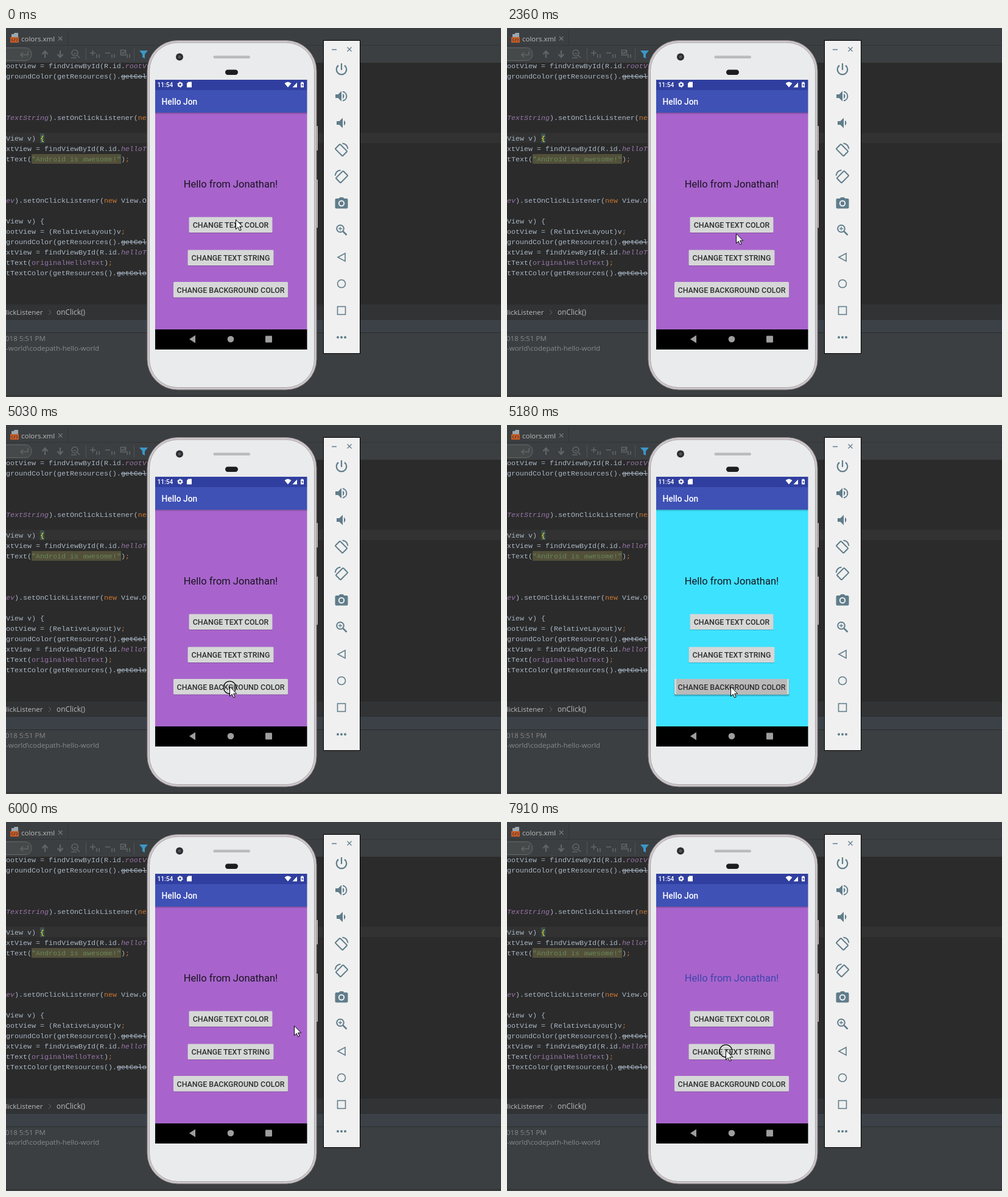
An HTML page that plays this animation: 813 by 606 pixels, repeating every 8 s.

```html
<!DOCTYPE html>
<html lang="en">
<head>
<meta charset="utf-8">
<title>Hello app in an emulator</title>
<style>
html, body { margin: 0; width: 100%; height: 100%; overflow: hidden; background: #3c3f41; }
svg { display: block; width: 813px; height: 606px; }
text { white-space: pre; }
.code { font: 11.667px "Liberation Mono", monospace; fill: #a9b7c6; }
.kw { fill: #cc7832; }
.fld { fill: #9876aa; }
.id { fill: #9876aa; font-style: italic; }
.str { fill: #6a8759; }
.brace { fill: #ffef28; }
.old { text-decoration: line-through; }
.ui { font: 11.5px "Open Sans", "Noto Sans", sans-serif; fill: #bbb; }
.dim { fill: #87898b; }
.app { font-family: Roboto, sans-serif; font-weight: 500; }
.btn text { font-size: 12.45px; fill: #2e2e2e; text-anchor: middle; }
.tool { fill: none; stroke: #626567; stroke-width: 1.6; }
.side { fill: none; stroke: #607d8b; stroke-width: 2; }
.solid { fill: #607d8b; stroke: none; }
</style>
</head>
<body>
<svg viewBox="0 0 813 606">
  <defs>
    <linearGradient id="fall" x2="0" y2="1">
      <stop offset="0" stop-opacity=".25"/><stop offset="1" stop-opacity="0"/>
    </linearGradient>
  </defs>

  <!-- editor window -->
  <rect width="813" height="606" fill="#3c3f41"/>
  <path d="M101.5 4V28M0 28.500H813" stroke="#323436"/>
  <path d="M9 10h4v-1l1-1h6v8H9z" fill="#9aa7b0"/>
  <rect x="7" y="15" width="14" height="9" fill="#c75c28"/>
  <path d="M11 17l-2 2.500 2 2.500M17 17l2 2.500-2 2.500M15 17l-2 5" fill="none" stroke="#45301f"/>
  <text class="ui" x="25" y="21.500">colors.xml</text>
  <path d="M86 14l6.500 6.500m0-6.500l-6.500 6.500" stroke="#77797b" stroke-width="1.200"/>
  <rect x="-20" y="32.500" width="62" height="21" rx="10" fill="#45494a" stroke="#646769"/>
  <g class="tool">
    <path d="M36 38v6H24m4-4l-4 4 4 4"/>
    <path d="M64 49V38m-4.500 5l4.500-5 4.500 5M89 37v11m-4.500-5l4.500 5 4.500-5" stroke-width="2.200"/>
    <circle cx="113" cy="41" r="5"/>
    <path d="M117 45l4 4M107 49h9M111 42h4"/>
    <path d="M138 41h9m-4.500-4.500v9M163 41h8M149 43v6m4-6v6M174 43v6m4-6v6M199 43v6m4-6v6"/>
    <path d="M188.500 36.500h8v8h-8zM190 40l2 2 4-4"/>
    <path d="M131.500 33v20M210.500 33v20" stroke="#515355" stroke-width="1"/>
  </g>
  <path d="M219 37h14l-5 6v7l-4-2v-5z" fill="#3b97c8"/>
  <rect y="57" width="813" height="397" fill="#2b2b2b"/>
  <rect y="172" width="813" height="17" fill="#323232"/>
  <rect x="56" y="173" width="7" height="16" fill="#3b514d"/>
  <rect x="42" y="207" width="147" height="16" fill="#52503a"/>
  <g id="code"></g>
  <rect y="454" width="813" height="25" fill="#313335"/>
  <rect y="479" width="813" height="21" fill="#3b4147"/>
  <path d="M0 478.500H813M0 500.500H813" stroke="#2b2d2f"/>
  <text class="ui" x="0" y="471">lickListener</text>
  <path d="M70 463l4 4-4 4" fill="none" stroke="#666"/>
  <text class="ui" x="83" y="471" style="font-size:11.900px">onClick()</text>
  <text class="ui dim" x="-1" y="514">018 5:51 PM</text>
  <text class="ui dim" x="0" y="530">-world\codepath-hello-world</text>
  <path d="M0 603.500H813" stroke="#2d2f31"/>

  <!-- phone -->
  <path d="M509 161h3v40h-3zM509 249h3v79h-3z" fill="#c9c3c6"/>
  <rect x="232" y="20.500" width="278" height="573.500" rx="50" fill="#cfc8cb" stroke="#8b868a"/>
  <rect x="235.500" y="24" width="271" height="566.500" rx="46.500" fill="#e9ebec" stroke="#aaa3a7"/>
  <circle cx="285" cy="47.500" r="6" fill="#2c2e32"/>
  <circle cx="285" cy="47.500" r="2.500" fill="#50545b"/>
  <rect x="340.500" y="45.500" width="60.500" height="4.500" rx="2.200" fill="#b9bbbc"/>
  <rect x="360" y="68.500" width="21" height="8.500" rx="4.200" fill="#1d1d1f"/>
  <rect id="page" x="245" y="139" width="249.500" height="356"/>
  <rect x="245" y="85" width="249.500" height="17" fill="#303f9f"/>
  <rect x="245" y="102" width="249.500" height="37" fill="#3f51b5"/>
  <rect x="245" y="139" width="249.500" height="3" fill="url(#fall)"/>
  <text class="app" x="248.500" y="97" font-size="10.200" fill="#fff">11:54</text>
  <text class="app" x="255.500" y="126" font-size="13.800" fill="#fff">Hello Jon</text>
  <g fill="#fff">
    <circle cx="286" cy="93" r="2.800" fill="none" stroke="#fff" stroke-width="2"/>
    <circle cx="286" cy="93" r="4.200" fill="none" stroke="#fff" stroke-dasharray="2.200"/>
    <path d="M299.500 88.500h5.500v9h-8v-6.500z"/>
    <path d="M457.500 91q5.500-5 11 0l-5.500 6.500zM470.500 97.500l7.500-8v8z"/>
    <path d="M484 89.500h1.500v-1h2v1h1.500v8h-5z"/>
  </g>
  <path d="M487 91l-2 3h1.500v2l2-3h-1.500z" fill="#303f9f"/>
  <text id="hello" x="369" y="261.500" text-anchor="middle" style="font:16.500px Roboto,sans-serif"></text>
  <g id="buttons" class="app btn"></g>
  <rect x="245" y="495" width="249.500" height="33"/>
  <g fill="#9e9e9e">
    <path d="M301 511l10-6.500v13z"/><circle cx="369" cy="511" r="5.300"/>
    <rect x="426" y="505.500" width="11" height="11" rx="1"/>
  </g>

  <!-- emulator toolbar -->
  <rect x="521.500" y="20.500" width="60" height="514" fill="#f0f0f0" stroke="#000"/>
  <path d="M535 35.500h8M560.500 31.500l7 7m0-7l-7 7" fill="none" stroke="#607d8b" stroke-width="1.300"/>
  <g class="side" transform="translate(551 0)">
    <path transform="translate(0 68)" d="M0-10V1M-5-6.500A8.300 8.300 0 1 0 5-6.500" stroke-width="2.200"/>
    <g transform="translate(0 112)">
      <path class="solid" d="M-10-3h4.500L0-8.500v17L-5.500 3H-10zM2-4.500q5 4.500 0 9z"/>
      <path d="M2-7.500A7.600 7.600 0 0 1 2 7.500"/>
    </g>
    <path class="solid" transform="translate(0 156)" d="M-8-3h4.500L2-8.500v17L-3.500 3H-8zM4-4.500q5 4.500 0 9z"/>
    <g id="turn" transform="translate(0 200)">
      <rect x="-5.500" y="-8.500" width="11" height="17" rx="1" transform="translate(-.5 .5) rotate(-45)"/>
      <path d="M1.500-10.500Q9.500-9.500 10.500-1.500"/>
    </g>
    <use href="#turn" transform="translate(0 44) scale(-1 1)"/>
    <g transform="translate(0 287.500)">
      <path class="solid" d="M-8.500-7.500h4l2-2h5l2 2h4q2 0 2 2V7q0 2-2 2h-17q-2 0-2-2V-5.500q0-2 2-2z"/>
      <circle cy=".500" r="4.200" fill="#607d8b" stroke="#f0f0f0"/>
    </g>
    <g transform="translate(-2 329.500)">
      <circle r="5.800"/><path d="M4.500 4.500l6 6" stroke-width="2.500"/>
      <path d="M-3 0h6M0-3v6" stroke-width="1.300"/>
    </g>
    <path d="M-6 376.500l12-6.500v13z" stroke-width="1.600"/>
    <circle cy="420" r="6.500" stroke-width="1.600"/>
    <rect x="-6.500" y="457.500" width="13" height="13" stroke-width="1.600"/>
    <g class="solid"><circle cx="-6" cy="508" r="2"/><circle cy="508" r="2"/><circle cx="6" cy="508" r="2"/></g>
  </g>

  <g id="mouse">
    <g id="ring" fill="none">
      <circle cx=".500" cy="2" r="9.300" stroke="#fff" stroke-opacity=".8"/>
      <circle cx=".500" cy="2" r="10.200" stroke="#000" stroke-width="1.200"/>
    </g>
    <path d="M.500.800V16.500l3.700-3.300 2.500 5.500 2.500-1-2.500-5.500H11.700z" fill="#fff" stroke="#000"/>
  </g>
</svg>
<script>
const $ = id => document.getElementById(id);
const LOOP = 8000;

// [baseline, [class, text]...]
const code = [
  [66, ["", "ootView = findViewById(R.id."], ["id", "rootV"]],
  [83, ["", "groundColor(getResources()."], ["old", "getCol"]],
  [151, ["id", "TextString"], ["", ").setOnClickListener("], ["kw", "ne"]],
  [185, ["", "View v) "], ["brace", "{"]],
  [202, ["", "xtView = findViewById(R.id."], ["id", "helloT"]],
  [219, ["", "tText("], ["str", '"Android is awesome!"'], ["", ")"], ["kw", ";"]],
  [287, ["id", "ev"], ["", ").setOnClickListener("], ["kw", "new "], ["", "View.O"]],
  [321, ["", "View v) {"]],
  [338, ["", "ootView = (RelativeLayout)v"], ["kw", ";"]],
  [355, ["", "groundColor(getResources()."], ["old", "getCol"]],
  [372, ["", "xtView = findViewById(R.id."], ["id", "helloT"]],
  [389, ["", "tText("], ["fld", "originalHelloText"], ["", ")"], ["kw", ";"]],
  [406, ["", "tTextColor(getResources()."], ["old", "getColo"]]
];
$("code").innerHTML = code.map(([y, ...parts]) =>
  `<text class="code" x="0" y="${y}">` +
  parts.map(([c, s]) => `<tspan class="${c}">${s}</tspan>`).join("") +
  "</text>").join("");

// [x, y, width, label]
const buttons = [
  [300.5, 310.5, 137, "CHANGE TEXT COLOR"],
  [298.5, 364.5, 141, "CHANGE TEXT STRING"],
  [275, 417, 188, "CHANGE BACKGROUND COLOR"]
];
$("buttons").innerHTML = buttons.map(([x, y, w, label]) => `
  <rect x="${x}" y="${y + 1}" width="${w}" height="25.500" rx="1.500" fill-opacity=".2"/>
  <g class="down">
    <rect x="${x - 1}" y="${y + 1}" width="${w + 2}" height="28" rx="2" fill-opacity=".1"/>
    <rect x="${x}" y="${y + 1}" width="${w}" height="26.500" rx="2" fill-opacity=".12"/>
  </g>
  <rect x="${x}" y="${y}" width="${w}" height="25.500" rx="1.500" fill="#d6d7d7"/>
  <rect class="down" x="${x + 3}" y="${y}" width="${w - 6}" height="25.500" fill="#bababa"/>
  <text x="369" y="${y + 17.5}">${label}</text>`).join("");
const downs = document.querySelectorAll(".down");

// cursor runs: [first step, last step, steps, x, y]
const runs = [
  [130, 280, 2, 365, 323],
  [1000, 1140, 2, 379, 309],
  [1290, 1410, 2, 399, 290],
  [2210, 2630, 4, 352, 384],
  [3350, 3480, 2, 436, 357],
  [3630, 3760, 2, 466, 345],
  [4340, 4890, 5, 367, 429],
  [5320, 5730, 4, 473, 334],
  [6270, 6940, 6, 365, 322],
  [7360, 7780, 4, 359, 374]
];
const presses = [[710, 850], [1690, 1810], [3090, 3220], [4060, 4200],
  [5030, 5180], [5860, 6000], [7080, 7210], [7910, LOOP]];
const ripples = [[[850, 1000], [7210, 7360]], [[3220, 3350]], [[5180, 5320]]];
const blue = [[850, 1810], [7210, LOOP]];
const swapped = [[3220, 4200]];
const cyan = [[5180, 6000]];

const within = (spans, t) => spans.some(([a, b]) => t >= a && t < b);
const show = (el, on) => el.setAttribute("visibility", on ? "visible" : "hidden");

function cursorAt(t) {
  let x = 377, y = 314;
  for (const [a, b, n, nx, ny] of runs) {
    if (t < a) break;
    const step = Math.floor((t - a) / (b - a) * (n - 1) + 1e-6) + 1;
    const k = Math.min(1, step / n);
    x += (nx - x) * k;
    y += (ny - y) * k;
  }
  return [Math.round(x), Math.round(y)];
}

function draw(t) {
  $("mouse").setAttribute("transform", `translate(${cursorAt(t)})`);
  show($("ring"), within(presses, t));
  $("page").setAttribute("fill", within(cyan, t) ? "#3de2ff" : "#a864cc");
  $("hello").setAttribute("fill", within(blue, t) ? "#3f45ad" : "#1a1420");
  const label = within(swapped, t) ? "Android is awesome!" : "Hello from Jonathan!";
  if ($("hello").textContent !== label) $("hello").textContent = label;
  downs.forEach((el, i) => show(el, within(ripples[i >> 1], t)));
}

const start = performance.now();
function tick() {
  draw((performance.now() - start) % LOOP);
  requestAnimationFrame(tick);
}
tick();
</script>
</body>
</html>
```
